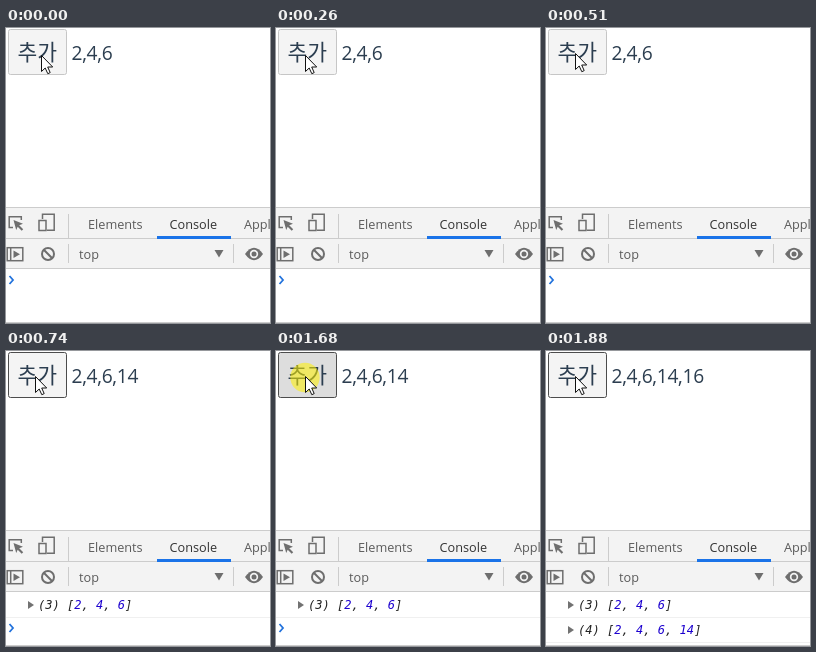
Recreate the animation shown at these times as an HTML page. Size 264 by 295 pixels, loop 2690 ms.

```html
<!DOCTYPE html>
<html lang="ko">
<head>
<meta charset="utf-8">
<title>Console demo</title>
<style>
html, body { margin: 0; width: 100%; height: 100%; overflow: hidden; background: #fff; }
svg { display: block; width: 264px; height: 295px; }
text { white-space: pre; }
.ui { font: 12.7px "Open Sans", "Noto Sans", sans-serif; fill: #5a5a5a; }
.list { font: 19.2px "Open Sans", "Noto Sans", sans-serif; letter-spacing: -.3px; fill: #2c3e50; }
.label { font: 300 21.5px "Noto Sans CJK KR", "Noto Sans CJK", sans-serif; fill: #2c3e50; }
.log { font: italic 12.05px "DejaVu Sans Mono", monospace; fill: #222; }
.num { fill: #1c00cf; }
.icon { fill: none; stroke: #6e6e6e; stroke-width: 1.5; }
.solid { fill: #6e6e6e; }
</style>
</head>
<body>
<svg viewBox="0 0 264 295">
  <rect width="264" height="295" fill="#fff"/>
  <rect id="button" x="2.5" y="1.5" width="58" height="45" rx="2"/>
  <text class="label" x="11.5" y="32">추가</text>
  <text id="list" class="list" x="65.5" y="32"></text>

  <rect y="179" width="264" height="62" fill="#f3f3f3"/>
  <path d="M0 179.5H264M0 210.5H264M0 240.5H264M0 294.5H264M62.5 186V210M62.5 216V235M227.5 216V235" stroke="#ccc"/>
  <rect x="151" y="208" width="74" height="3" fill="#1a73e8"/>
  <text class="ui" x="82" y="201">Elements</text>
  <text class="ui" x="163.5" y="201" style="fill:#333">Console</text>
  <text class="ui" x="238" y="201">Appl</text>
  <text class="ui" x="73" y="231">top</text>

  <path class="icon" d="M7 199.5H3.2V188.7H15.3V192"/>
  <path class="solid" d="M7.5 192L17 195.7 13.2 197.2 17.2 201.2 15.7 202.7 11.7 198.7 10.2 202Z"/>
  <path class="icon" d="M36.5 191V186.2H48.2V202.3H41"/>
  <rect class="icon" x="33" y="192.5" width="7" height="10"/>
  <rect class="icon" x="1.2" y="219.7" width="15.6" height="13"/>
  <path class="icon" d="M4.7 220V233"/>
  <path class="solid" d="M7.5 222.5L14 226.2 7.5 230Z"/>
  <g class="icon" style="stroke-width:2"><circle cx="42" cy="226" r="6"/><path d="M37.8 221.8L46.2 230.2"/></g>
  <path class="solid" d="M208.5 222H217.5L213 229.5Z"/>
  <path class="solid" d="M239 226Q248 213.5 257 226Q248 238.5 239 226Z"/>
  <circle cx="248" cy="226" r="4.2" fill="#f3f3f3"/>
  <circle class="solid" cx="248" cy="226" r="2.5"/>

  <g id="logs"></g>
  <path id="prompt" d="M3.5 248L7 252 3.5 256" fill="none" stroke="#2272dc" stroke-width="1.8"/>

  <circle id="press" cx="29" cy="26.5" r="14.7" fill="#fff000" opacity=".55"/>
  <path id="cursor" d="M.5 .5V16.5L4.2 13 6.8 18.7 9.2 17.6 6.7 12H11.7Z" fill="#fff" stroke="#111"/>
</svg>
<script>
const LOOP = 2690, ROW = 25;
const $ = id => document.getElementById(id);
const start = [2, 4, 6], added = [14, 16];

// Latest value of a [time, value] schedule
const at = (steps, t) => steps.reduce((v, [when, next]) => t >= when ? next : v, steps[0][1]);

const cursorSteps = [[0, [35, 27]], [130, [32, 27]], [260, [29, 27]], [510, [29, 25]]];
const pressSteps = [[0, false], [560, true], [740, false], [1680, true], [1880, false]];
const countSteps = [[0, 0], [740, 1], [1880, 2]];

const values = n => start.concat(added.slice(0, n));

function logRow(i) {
  const items = values(i), y = 258 + i * ROW;
  const nums = items.map(v => `<tspan class="num">${v}</tspan>`).join(', ');
  return `<path d="M22 ${y - 8}L28 ${y - 4} 22 ${y}Z" fill="#727272"/>
    <text class="log" x="32" y="${y}">(${items.length}) [${nums}]</text>
    <path d="M0 ${y + 8.5}H264" stroke="#f0f0f0"/>`;
}

let shown = -1;
function render(t) {
  const [x, y] = at(cursorSteps, t), down = at(pressSteps, t), count = at(countSteps, t);
  $('cursor').setAttribute('transform', `translate(${x} ${y})`);
  $('press').style.display = down ? '' : 'none';
  $('button').setAttribute('fill', down ? '#ddd' : '#f4f4f4');
  $('button').setAttribute('stroke', t < 560 ? '#c6c6c6' : '#4c4c4c');
  if (count === shown) return;
  shown = count;
  $('list').textContent = values(count).join();
  $('logs').innerHTML = Array.from({ length: count }, (_, i) => logRow(i)).join('');
  $('prompt').setAttribute('transform', `translate(0 ${count * ROW})`);
  $('prompt').style.display = count < 2 ? '' : 'none';
}

const t0 = performance.now();
function tick() {
  render((performance.now() - t0) % LOOP);
  requestAnimationFrame(tick);
}
tick();
</script>
</body>
</html>
```
